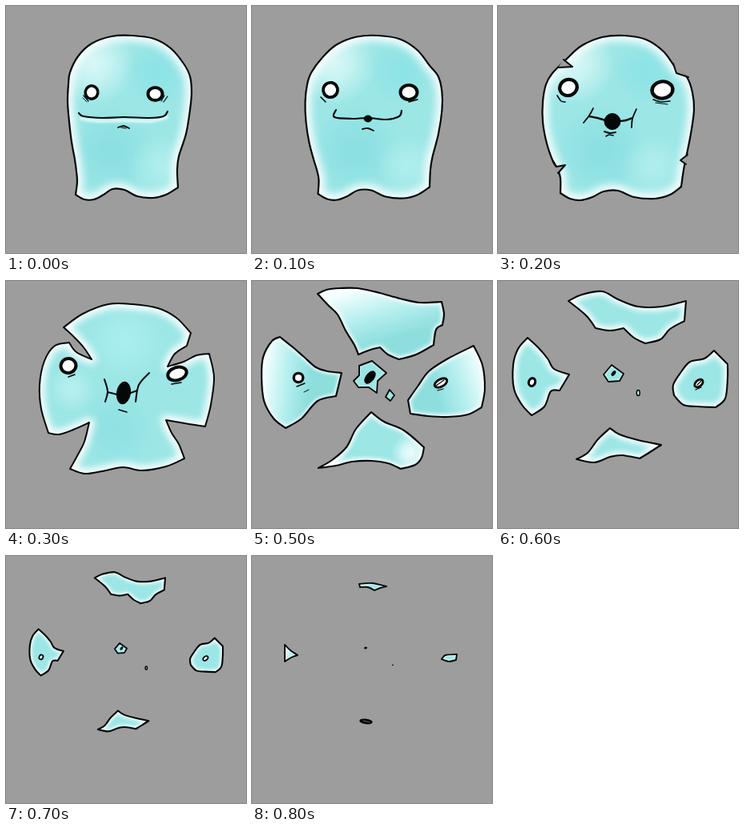
Recreate the animation shown at these times as an HTML page with a canvas. Size 300 by 309 pixels, loop 900 ms.

```html
<!DOCTYPE html>
<html lang="en">
<head>
<meta charset="utf-8">
<title>Bursting blob</title>
<style>
  html, body { margin: 0; width: 100%; height: 100%; overflow: hidden; background: #9d9d9d; }
  canvas { display: block; width: 100vw; height: 100vh; }
</style>
</head>
<body>
<canvas id="stage" width="300" height="309"></canvas>
<script>
const ctx = document.getElementById('stage').getContext('2d');
const GREY = '#9d9d9d', INK = '#050808', TEAL = '#9ce6e6', PALE = '#d9f8f8';
const STEP = 100;

// Outlines are runs of "x y" pairs; "/" ends a smooth run in a corner.
const parse = spec => spec.split('/').map(run => {
  const n = run.trim().split(/\s+/).map(Number), pts = [];
  for (let i = 0; i < n.length; i += 2) pts.push([n[i], n[i + 1]]);
  return pts;
});
const runsOf = shape => typeof shape === 'string' ? parse(shape) : shape;
const mix = (a, b, t) => a + (b - a) * t;
const blend = (a, b, t) => a.map((run, i) => run.map((p, j) => p.map((v, k) => mix(v, b[i][j][k], t))));
const shrink = (spec, s, cx, cy, dx = 0, dy = 0) =>
  parse(spec).map(run => run.map(([x, y]) => [cx + dx + (x - cx) * s, cy + dy + (y - cy) * s]));

function trace(shape) {
  const path = new Path2D();
  let last = null;
  for (const run of runsOf(shape)) {
    const p = last ? [last, ...run] : run;
    if (!last) path.moveTo(...p[0]);
    for (let i = 0; i < p.length - 1; i++) {
      const a = p[i - 1] || p[i], b = p[i], c = p[i + 1], d = p[i + 2] || c;
      path.bezierCurveTo(b[0] + (c[0] - a[0]) / 6, b[1] + (c[1] - a[1]) / 6,
        c[0] - (d[0] - b[0]) / 6, c[1] - (d[1] - b[1]) / 6, c[0], c[1]);
    }
    last = p[p.length - 1];
  }
  return path;
}

function line(shape, width = 1.6, color = INK) {
  ctx.strokeStyle = color;
  ctx.lineWidth = width;
  ctx.stroke(trace(shape));
}

function soft(x, y, r, color) {
  const g = ctx.createRadialGradient(x, y, 0, x, y, r);
  g.addColorStop(0, color + 'ff');
  g.addColorStop(0.4, color + 'b0');
  g.addColorStop(1, color + '00');
  ctx.fillStyle = g;
  ctx.fillRect(x - r, y - r, 2 * r, 2 * r);
}

// A teal piece with a white inner glow; light runs from pale to teal.
function piece(shape, { light, glow = 8, spots = [], ink = 2, inside } = {}) {
  const path = trace(shape);
  path.closePath();
  ctx.save();
  ctx.clip(path);
  ctx.fillStyle = TEAL;
  if (light) {
    const g = ctx.createLinearGradient(...light);
    g.addColorStop(0, '#f4ffff');
    g.addColorStop(0.55, '#b4eeee');
    g.addColorStop(1, '#8edede');
    ctx.fillStyle = g;
  }
  ctx.fillRect(0, 0, 300, 309);
  spots.forEach(s => soft(...s));
  if (glow) {
    ctx.filter = `blur(${glow * 0.4}px)`;
    ctx.strokeStyle = '#fff';
    ctx.lineWidth = glow;
    ctx.stroke(path);
    ctx.filter = 'none';
  }
  if (inside) inside();
  ctx.restore();
  ctx.strokeStyle = INK;
  ctx.lineWidth = ink;
  ctx.stroke(path);
}

function oval(x, y, rx, ry, turn = 0, width = 3, fill = '#fff') {
  ctx.beginPath();
  ctx.ellipse(x, y, rx, ry, turn, 0, 7);
  ctx.fillStyle = fill;
  ctx.fill();
  ctx.strokeStyle = INK;
  ctx.lineWidth = width;
  if (width) ctx.stroke();
}

function notch(spec) {
  const path = trace(spec);
  ctx.fillStyle = GREY;
  ctx.fill(path);
  line(spec, 2);
}

const calm = parse(`87 236 89 220 88 207 86 192 82 170 79 145 77 120 78 98 80 83 90 63 107 47 132 38
  158 37 185 41 206 53 222 72 230 88 232 108 230 130 225 160 216 188 214 205 215 227 /
  200 236 184 240 164 238 148 230 133 229 122 236 110 242 98 242 87 236`);
const puffed = parse(`78 234 78 215 74 203 69 195 61 172 56 145 56 120 60 98 68 84 85 67 104 50 130 39
  158 37 185 42 207 57 222 77 236 89 243 108 245 130 241 160 235 190 232 205 229 226 /
  215 236 196 241 170 239 150 231 132 232 118 239 103 243 90 241 78 234`);

function body(t, inside) {
  piece(blend(calm, puffed, t), {
    glow: 13, ink: 2.2, inside,
    spots: [[mix(110, 95, t), 72, 52, PALE], [mix(190, 185, t), 82, 42, '#8ce3e6'],
      [130, 182, 58, '#8adfe1'], [195, 200, 40, '#b0eeee']]
  });
}

function whole() {
  body(0, () => {
    ctx.filter = 'blur(1.5px)';
    line('94 141 120 144 147 143 180 144 201 139', 4, '#e4fbfb');
    ctx.filter = 'none';
  });
  oval(107, 108, 7.8, 8.2, 0.2, 3.6);
  oval(186.5, 110, 9, 8, 0, 4);
  line('97 112 103 119', 1.4);
  line('96 115 101 120', 1);
  line('194 119 198 112', 1.2);
  line('197 120 202 113', 1.2);
  line('91 134 97 138 120 140 147 139 180 140 197 138 202 132', 2.2);
  line('140 152 147 150 154 153', 1.8);
  line('144 152 150 153', 1.2);
}

function swelling() {
  body(0.5);
  oval(98, 105, 9, 9.2, 0.2, 3.8);
  oval(196, 108, 10.5, 9, 0, 4);
  line('86 114 92 120');
  line('196 120 207 117');
  line('105 130 103 139 125 141 145 140 168 142 184 138 187 131', 2.2);
  oval(145, 141, 5, 4, 0, 1, INK);
  line('138 154 145 153 152 156', 1.8);
}

function pucker() {
  body(1);
  notch('82 67 / 93 76 / 75 77');
  notch('219 72 / 223 84 / 238 89');
  notch('69 194 / 73 201 / 84 199 / 75 209');
  notch('237 186 / 228 193 / 235 198');
  oval(88, 102, 11, 10, -0.4, 4.2);
  oval(205.5, 105, 13, 10.5, -0.15, 4.4);
  line('74 112 79 119 84 120');
  line('194 117 204 120 215 119');
  line('197 121 212 123', 1.2);
  line('119 128 114 137 107 146', 1.8);
  line('114 138 124 140 134 143', 2.4);
  line('152 144 160 143 168 140', 2.4);
  line('173 129 168 141 167 152', 1.8);
  oval(143, 144.5, 10, 10, 0, 1, INK);
  line('133 157 140 159 147 158', 2);
  line('135 163 139 161 144 162', 1.6);
}

function tearing() {
  piece(`72 58 / 96 41 128 29 158 29 190 34 213 46 231 65 / 226 81 / 211 91 202 107 /
    222 101 238 93 254 91 / 260 120 256 155 249 182 / 229 179 200 174 /
    207 190 216 204 223 222 / 200 232 170 237 146 233 120 238 98 241 80 235 /
    90 217 98 201 104 177 / 84 186 66 192 53 190 / 44 160 42 130 48 100 61 81 79 77 /
    88 89 107 98 / 97 83 85 70 72 58`,
    { glow: 12, spots: [[150, 75, 50, '#aaeeee'], [135, 185, 50, '#8fe1e2'], [82, 135, 30, '#b8f0f0']] });
  oval(78, 106, 9.5, 9, -0.3, 4);
  oval(214, 116, 12, 8, -0.3, 4);
  line('78 120 86 117');
  line('207 129 219 127');
  line('123 123 127 138 124 151', 2);
  line('179 115 166 130 162 151', 2);
  line('127 139 139 142', 2);
  line('153 141 164 137', 2);
  oval(147, 140, 8.5, 14, 0.15, 1, INK);
  line('141 161 151 164', 1.6);
}

function cross() {
  piece(`83 41 / 105 28 140 19 175 22 205 31 225 42 239 53 / 232 66 229 83 /
    215 92 202 105 195 119 181 131 / 200 127 212 117 222 105 242 102 270 86 /
    274 112 272 145 266 172 / 240 176 220 176 200 168 186 160 / 187 180 195 195 212 207 219 220 /
    200 227 170 232 140 231 110 239 82 237 / 99 223 114 205 117 188 118 170 127 156 /
    115 165 95 175 75 178 61 187 40 190 / 33 165 30 140 30 110 38 85 48 72 63 68 80 71 94 79 /
    97 91 110 101 127 108 / 116 95 109 85 108 66 98 53 83 41`,
    { glow: 11, ink: 1.9, spots: [[160, 62, 48, '#a8eeee'], [155, 200, 38, '#92e2e2'],
      [100, 132, 36, '#9ae8e8'], [225, 148, 30, '#94e4e4']],
      inside() {
        ctx.filter = 'blur(1.5px)';
        line('128 115 135 140 133 160', 6, '#fff');
        line('184 110 171 124 164 145 162 160', 6, '#fff');
        line('140 118 150 114 160 118', 5, '#effdfd');
        ctx.filter = 'none';
      } });
  line('126 107 134 120 140 139 138 152', 2.2);
  line('133 145 142 158 151 162', 2);
  line('186 103 171 118 162 132 157 150 155 175', 2.2);
  line('182 131 166 133', 2);
  line('168 157 186 160', 1.8);
  oval(150, 137, 5.5, 16, 0.2, 1, INK);
  line('142 153 149 157', 3);
  oval(67, 110, 8, 8, 0, 4);
  line('72 123 78 118', 1.4);
  oval(222, 128, 10.5, 5.6, -0.45, 3.4);
  oval(224, 127, 4, 2.4, -0.45, 1);
  line('212 138 221 138', 1.2);
}

function apart() {
  piece(`82 16 / 93 11 110 9 132 9 160 15 185 22 210 27 237 26 / 240 41 238 55 / 230 61 227 80 /
    205 92 184 98 / 170 92 160 83 / 148 86 133 92 / 128 80 117 62 107 42 95 30 82 16`,
    { light: [145, 6, 165, 75], glow: 6, ink: 2.2 });
  piece(`35 70 / 25 75 14 95 12 120 15 150 27 172 42 184 / 62 172 82 150 105 144 / 112 115 /
    95 113 80 108 65 95 50 82 35 70`, { light: [12, 125, 72, 132], glow: 5, ink: 2.2 });
  piece(`277 81 / 288 105 291 135 287 158 / 270 167 245 170 220 169 198 166 / 195 149 /
    207 132 221 113 245 97 277 81`, { light: [292, 115, 228, 135], glow: 6, ink: 2.1 });
  piece(`149 164 / 165 176 190 187 215 208 / 212 221 204 230 186 235 /
    170 228 150 225 125 226 105 231 83 234 / 100 224 118 208 130 185 149 164`,
    { glow: 7, ink: 2.1, spots: [[198, 215, 24, '#effdfd'], [98, 226, 22, '#effdfd']] });
  piece('134 106 / 150 100 / 168 115 / 157 125 / 156 140 / 146 133 / 133 133 / 127 125 / 134 118 / 134 106',
    { glow: 2, ink: 1.9 });
  piece('172 136 / 178 143 / 173 150 / 167 145 / 172 136', { glow: 1, ink: 1.8 });
  oval(147.5, 120.5, 5, 9, 0.65, 1, INK);
  oval(58, 121, 5.8, 5.6, 0, 3.4);
  line('56 132 66 128', 1.4);
  line('65 139 71 136', 1);
  oval(236, 127.5, 8.5, 4.6, -0.5, 3);
  line('230 131 240 124', 1.2);
  line('232 137 239 135', 1.3);
}

const shards = {
  top: `88 25 / 105 17 130 13 150 23 175 32 205 32 235 25 / 233 50 / 215 60 203 73 184 78 /
    170 71 157 59 / 140 62 122 59 / 110 43 88 25`,
  left: '37 71 / 25 85 19 105 20 135 30 155 42 168 / 58 157 66 138 77 137 / 89 117 / 70 110 62 97 50 83 37 71',
  right: `270 87 / 258 97 240 101 228 115 219 130 220 143 / 232 155 250 157 272 158 /
    284 147 287 122 287 104 / 270 87`,
  base: '140 184 / 152 192 175 199 204 205 / 190 214 177 222 / 155 218 140 220 120 227 98 223 / 112 215 125 198 140 184',
  mouth: '142 105 / 157 116 / 152 125 / 138 126 / 132 117 / 142 105'
};

function scatter(s) {
  const look = { glow: 9 * s, ink: 2.1 };
  const cut = (name, ...at) => piece(shrink(shards[name], s, ...at), look);
  cut('top', 145, 31);
  cut('left', 46, 122);
  cut('right', 247, 126);
  cut('base', 140, 208);
  piece(shrink(shards.mouth, s, 142, 115), { glow: 2, ink: 1.8 });
  oval(144.5, 115.5, 1.8 * s, 3.6 * s, 0.6, 1, INK);
  oval(175.3, 140, 2 * s, 3.5 * s, 0, 1.5, '#bfeeee');
  oval(mix(46, 42.5, s), 126.5, 4 * s, 5 * s, 0.4, 3 * s);
  oval(mix(247, 251, s), 128, 6 * s, 3.8 * s, -0.7, 2.8 * s);
  if (s === 1) {
    line('249 130 255 124', 1.2);
    line('247 136 254 133', 1.3);
  }
}

function crumbs() {
  piece('134 35 / 150 34 168 38 / 160 40 153 43 / 145 39 135 39 / 134 35', { glow: 2, ink: 1.9 });
  piece('41 111 / 48 118 57 124 / 49 127 41 132 / 41 111', { light: [40, 119, 56, 126], glow: 2, ink: 1.9 });
  piece('237 129 / 242 124 256 123 / 255 130 / 246 132 237 129', { glow: 3, ink: 1.9 });
  oval(142.5, 207, 7.5, 2.6, 0.12, 1.5, INK);
  line('139 206 147 208', 0.8, '#728484');
  oval(142, 115, 1.6, 1, -0.2, 1, INK);
  oval(176, 136.5, 0.6, 0.6, 0, 0.7, INK);
}

const poses = [whole, swelling, pucker, tearing, cross, apart,
  () => scatter(1), () => scatter(0.6), crumbs];
let shown = -1;

function draw(now) {
  const i = Math.floor(now / STEP) % poses.length;
  if (i !== shown) {
    shown = i;
    ctx.fillStyle = GREY;
    ctx.fillRect(0, 0, 300, 309);
    poses[i]();
  }
}

function tick() {
  draw(performance.now() - start);
  requestAnimationFrame(tick);
}

ctx.lineCap = ctx.lineJoin = 'round';
const start = performance.now();
tick();
</script>
</body>
</html>
```
